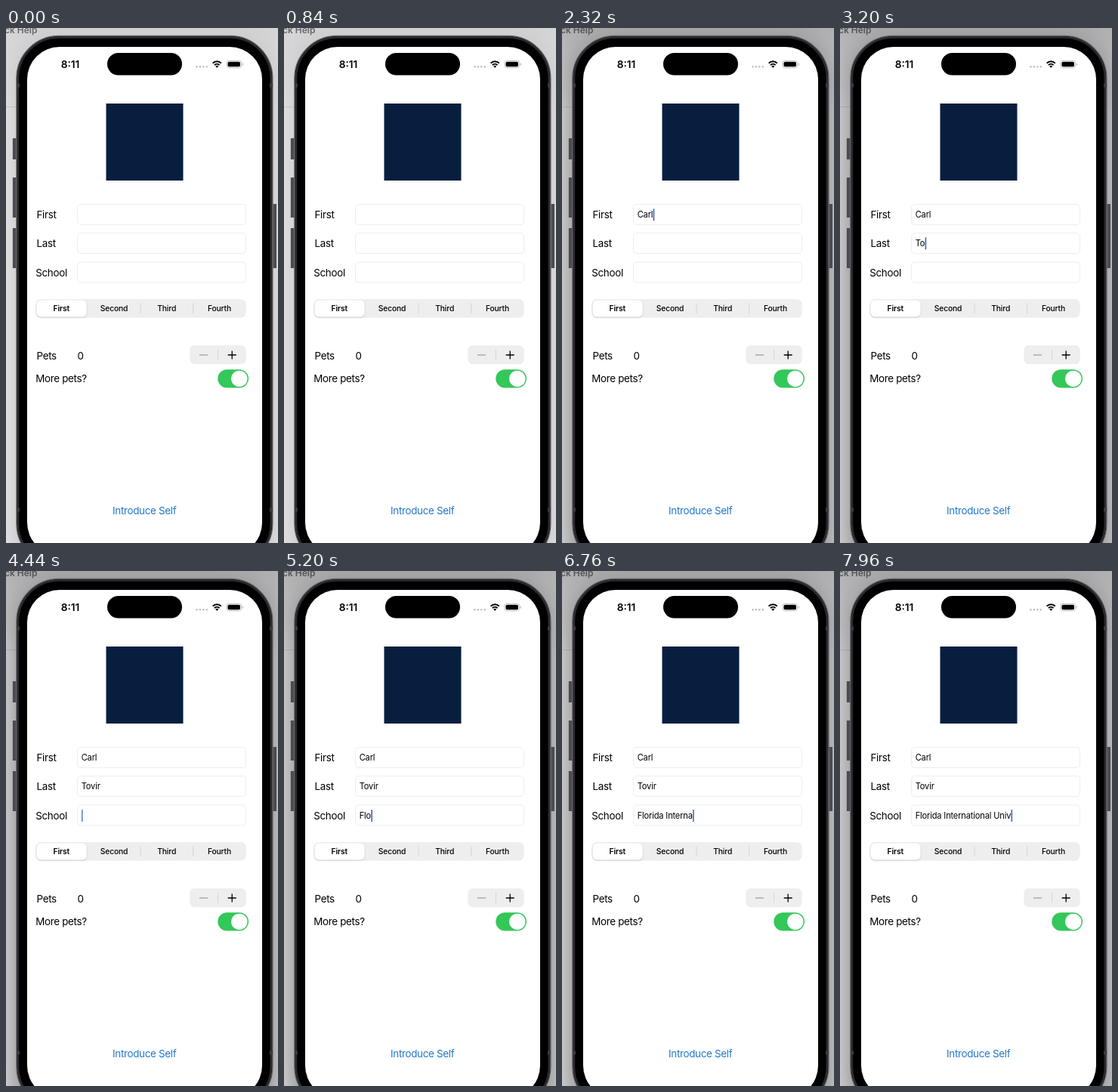
An HTML page for the animation above (8000 ms loop, 360 by 682 pixels).

```html
<!DOCTYPE html>
<html lang="en">
<head>
<meta charset="utf-8">
<title>Introduction form</title>
<style>
  html, body { margin: 0; width: 100%; height: 100%; overflow: hidden; }
  svg { display: block; width: 360px; height: 682px; }
  text { font-family: Inter, "Liberation Sans", sans-serif; white-space: pre; }
  .label { font-size: 13.45px; letter-spacing: -.33px; }
  .entry { font-size: 11.1px; letter-spacing: -.17px; }
  .tab { font-size: 10.3px; font-weight: 500; letter-spacing: -.15px; text-anchor: middle; }
  .field { fill: #fff; stroke: #eeeeef; }
  .control { fill: #eeeeef; }
  .split { stroke: #d6d6d9; }
</style>
</head>
<body>
<svg viewBox="0 0 360 682">
  <defs>
    <filter id="blur" x="-30%" y="-30%" width="160%" height="160%"><feGaussianBlur stdDeviation="22"/></filter>
    <filter id="soft" x="-10%" y="-30%" width="120%" height="180%"><feDropShadow dx="0" dy="1" stdDeviation="1.2" flood-opacity=".2"/></filter>
    <linearGradient id="fall" x2="0" y2="1">
      <stop offset="0" stop-opacity=".6"/>
      <stop offset="1" stop-opacity="0"/>
    </linearGradient>
  </defs>

  <!-- Desktop behind the phone -->
  <rect width="360" height="682" fill="#f0eff1"/>
  <path d="M0 104.5H30" stroke="#d8d7d9"/>
  <text x="41.5" y="7" font-size="12" font-weight="600" text-anchor="end" fill="#77767a">ck Help</text>
  <g id="shade">
    <rect width="360" height="110" fill="url(#fall)"/>
    <rect x="4" y="10" width="360" height="730" rx="60" filter="url(#blur)"/>
  </g>

  <!-- Phone -->
  <path d="M11.2 146v28M11.2 198v53M11.2 265v53M355.7 233v85" stroke="#4c4b4f" stroke-width="4.6"/>
  <rect x="14" y="10.5" width="338.8" height="702" rx="56" fill="#000" stroke="#5c5b60" stroke-width="1.4"/>
  <rect x="16" y="12.5" width="334.8" height="698" rx="54" fill="none" stroke="#2b2a2e" stroke-width="2.5"/>
  <path d="M14 76h4M349 76h4M14 638h4M349 638h4" stroke="#3c3b3f" stroke-width="5"/>
  <rect x="28" y="25" width="311" height="673" rx="43" fill="#fff"/>

  <!-- Status bar -->
  <rect x="134" y="33" width="99" height="29.5" rx="14.7"/>
  <text x="85" y="52.7" font-size="13.7" font-weight="600" text-anchor="middle">8:11</text>
  <path d="M252.5 51.3h14" stroke="#b9b9bb" stroke-width="2.4" stroke-linecap="round" stroke-dasharray="0 4.4"/>
  <path d="M273.6 46.6a8 8 0 0 1 11.2 0M275.9 49a4.8 4.8 0 0 1 6.6 0" fill="none" stroke="#000" stroke-width="2"/>
  <path d="M279.2 52.8l-2-2a2.9 2.9 0 0 1 4 0z"/>
  <rect x="292" y="43.3" width="19.5" height="9.4" rx="3" fill="none" stroke="#b8b8ba" stroke-width=".9"/>
  <rect x="293.5" y="44.8" width="16.5" height="6.4" rx="1.8"/>
  <path d="M313.3 46.5v3" stroke="#b8b8ba" stroke-width="1.2"/>

  <rect x="132.5" y="100" width="102" height="102" fill="#081e3f"/>

  <!-- Form -->
  <g class="label">
    <text x="40.5" y="252.4">First</text>
    <text x="40.5" y="290">Last</text>
    <text x="39.2" y="328.6">School</text>
    <text x="40.5" y="438.6">Pets</text>
    <text x="94.5" y="438.6">0</text>
    <text x="39.2" y="469.3">More pets?</text>
    <text x="183.2" y="643.5" text-anchor="middle" fill="#2177cb">Introduce Self</text>
  </g>
  <g id="fields"></g>
  <rect id="caret" width="1.6" height="16" rx=".6" fill="#3568c8"/>

  <rect class="control" x="39.3" y="359" width="278.4" height="24.7" rx="7"/>
  <rect x="40.8" y="360.5" width="65.6" height="21.8" rx="5.5" fill="#fff" filter="url(#soft)"/>
  <path class="split" d="M178 364.5v13.5M247.7 364.5v13.5"/>
  <g class="tab">
    <text x="73.3" y="375.2" font-weight="600">First</text>
    <text x="143" y="375.2">Second</text>
    <text x="212.7" y="375.2">Third</text>
    <text x="282.5" y="375.2">Fourth</text>
  </g>

  <rect class="control" x="243.3" y="420.2" width="74.4" height="25" rx="6.5"/>
  <path class="split" d="M280.5 426v13.5"/>
  <path d="M256 433h11" stroke="#a0a0a3" stroke-width="1.3"/>
  <path d="M293.7 433h11M299.2 427.5v11" stroke="#000" stroke-width="1.3"/>

  <rect x="280.3" y="452.2" width="40.7" height="24.3" rx="12.15" fill="#34c759"/>
  <circle cx="308.8" cy="464.4" r="10.7" fill="#fff"/>
</svg>

<script>
const LOOP = 8000;
const $ = id => document.getElementById(id);
const clamp = v => Math.max(0, Math.min(1, v));

// focus: when the caret enters; keys: when each letter is typed
const fields = [
  { y: 233.5, base: 251.3, focus: 1160, text: "Carl", keys: [1960, 2080, 2200, 2320] },
  { y: 271.5, base: 289.3, focus: 2680, text: "Tovir", keys: [3000, 3200, 3280, 3360, 3480] },
  { y: 310, base: 328, focus: 3920, text: "Florida International Univ",
    keys: [4960, 5080, 5160, 5320, 5400, 5480, 5520, 5680,
           5840, 5960, 6080, 6240, 6520, 6640, 6720, 6840, 6920, 7000, 7080, 7160, 7320,
           7440, 7640, 7760, 7880, 7960] }
];

function add(name, attrs) {
  const el = document.createElementNS("http://www.w3.org/2000/svg", name);
  for (const key in attrs) el.setAttribute(key, attrs[key]);
  return $("fields").appendChild(el);
}

for (const f of fields) {
  add("rect", { class: "field", x: 94.5, y: f.y, width: 223, height: 27, rx: 4.5 });
  f.el = add("text", { class: "entry", x: 99.7, y: f.base });
}

// Steady for a moment after each key, then fades out and back
function blink(age) {
  const a = age % 1040;
  return 1 - clamp((a - 500) / 120) + clamp((a - 820) / 120);
}

function draw(t) {
  $("shade").setAttribute("opacity", .18 + .24 * clamp((t - 960) / 120));

  let active = null, last = 0;
  for (const f of fields) {
    const count = f.keys.filter(k => k <= t).length;
    f.el.textContent = f.text.slice(0, count);
    if (t >= f.focus) {
      active = f;
      last = count ? f.keys[count - 1] : f.focus;
    }
  }

  const caret = $("caret");
  caret.setAttribute("opacity", active ? blink(t - last) : 0);
  if (active) {
    const width = active.el.textContent ? active.el.getComputedTextLength() : 0;
    caret.setAttribute("x", 100 + width);
    caret.setAttribute("y", active.base - 12);
  }
}

function tick() {
  draw(performance.now() % LOOP);
  requestAnimationFrame(tick);
}
tick();
</script>
</body>
</html>
```
